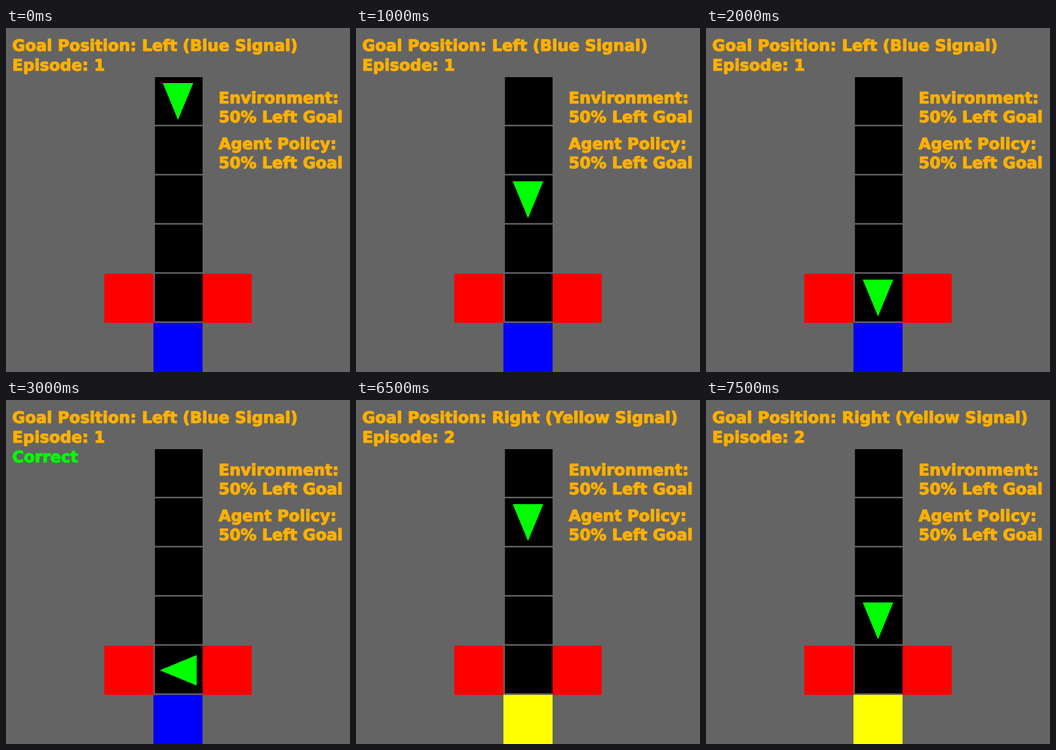
A matplotlib script for the animation above (8 s loop, 525x525 px).

```python
import matplotlib.pyplot as plt
from matplotlib.animation import FuncAnimation
from matplotlib.patches import Polygon, Rectangle
from matplotlib.patheffects import withStroke

SIZE, DPI, CELL = 525, 100, 75
LINE = 7 / 3  # grid line width in pixels
PT = 72 / DPI  # points per pixel
STEP_MS, STEPS = 500, 16
GREY, AMBER, GREEN = "#646464", "#ffb000", "#00ff00"

fig = plt.figure(figsize=(SIZE / DPI, SIZE / DPI), dpi=DPI, facecolor=GREY)
ax = fig.add_axes([0, 0, 1, 1])
ax.set_xlim(0, SIZE)
ax.set_ylim(SIZE, 0)
ax.axis("off")


def box(x, y, w, h, color):
    return ax.add_patch(Rectangle((x, y), w, h, facecolor=color,
                                  linewidth=0, snap=False))


def label(x, baseline, text="", color=AMBER):
    heavy = [withStroke(linewidth=1.1 * PT, foreground=color)]
    return ax.text(x, baseline, text, color=color, fontsize=24.15 * PT,
                   family="DejaVu Sans", weight="bold", ha="left",
                   va="baseline", path_effects=heavy)


# T-maze: two goal cells, a corridor and the signal cell
box(150, 375, CELL, CELL, "#ff0000")
box(300, 375, CELL, CELL, "#ff0000")
box(225, 375, CELL, CELL, GREY)
for row in range(5):
    box(225 + LINE, CELL * (row + 1), CELL - LINE, CELL - LINE, "black")
signal = box(225, 450, CELL, CELL, "#0000ff")

goal = label(9.5, 35)
episode = label(9.5, 65)
result = label(9.5, 95, "Correct", GREEN)
label(324.5, 115, "Environment:")
label(324.5, 144, "50% Left Goal")
label(324.5, 185, "Agent Policy:")
label(324.5, 214, "50% Left Goal")

agent = ax.add_patch(Polygon([(0, 0), (1, 0), (0, 1)], facecolor=GREEN,
                             linewidth=0, snap=False))


def agent_points(row, facing_left):
    cx, cy = 262.5, CELL * (row + 1.5)
    shape = [(-0.31, -0.38), (0.31, -0.38), (0, 0.37)]
    if facing_left:
        shape = [(-y, x) for x, y in shape]
    return [(cx + CELL * x, cy + CELL * y) for x, y in shape]


def update(i):
    second = i >= 12
    step = i - 12 if second else i
    agent.set_xy(agent_points(min(step, 4), step >= 5))
    result.set_visible(step >= 6)
    signal.set_facecolor("#ffff00" if second else "#0000ff")
    side = "Right (Yellow Signal)" if second else "Left (Blue Signal)"
    goal.set_text("Goal Position: " + side)
    episode.set_text(f"Episode: {2 if second else 1}")
    return agent, result, signal, goal, episode


anim = FuncAnimation(fig, update, frames=STEPS, interval=STEP_MS,
                     init_func=lambda: update(0), repeat=True)
plt.show()
```
